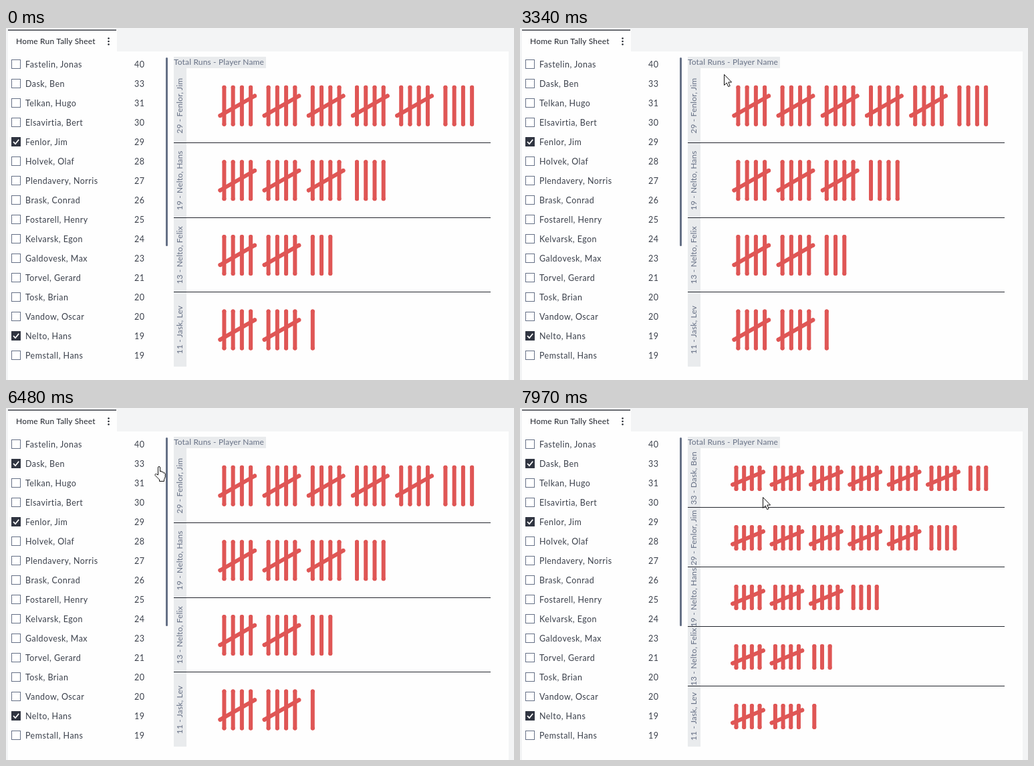
An HTML page for the animation above (8 s loop, 760 by 526 pixels).

```html
<!DOCTYPE html>
<html lang="en">
<head>
<meta charset="utf-8">
<title>Home Run Tally Sheet</title>
<style>
  html, body { margin: 0; width: 100%; height: 100%; overflow: hidden; background: #f3f4f5; }
  svg { display: block; }
  text { font-family: Lato, "Open Sans", sans-serif; font-size: 12.5px; letter-spacing: .45px; fill: #3b404b; }
  .title { font-size: 12px; letter-spacing: .2px; fill: #20242c; }
  .label { font-size: 12px; letter-spacing: .15px; fill: #667085; }
  .tally { stroke: #df5655; stroke-width: 6; stroke-linecap: round; }
</style>
</head>
<body>
<svg id="stage" width="760" height="526" xmlns="http://www.w3.org/2000/svg"></svg>
<script>
const LOOP = 8000, CHECK = 6240, SWAP = 6540, FADE = 560;
const TOP = 60.4;

const players = [
  ["Fastelin, Jonas", 40], ["Dask, Ben", 33], ["Telkan, Hugo", 31], ["Elsavirtia, Bert", 30],
  ["Fenlor, Jim", 29], ["Holvek, Olaf", 28], ["Plendavery, Norris", 27], ["Brask, Conrad", 26],
  ["Fostarell, Henry", 25], ["Kelvarsk, Egon", 24], ["Galdovesk, Max", 23], ["Torvel, Gerard", 21],
  ["Tosk, Brian", 20], ["Vandow, Oscar", 20], ["Nelto, Hans", 19], ["Pemstall, Hans", 19]
];
const before = [players[4], players[14], ["Nelto, Felix", 13], ["Jask, Lev", 11]];
const after = [players[1], ...before];

// Row height, first bar, bar spacing, half heights of bar and slash.
const wide = { row: 111.6, x: 326.4, step: 13.24, bar: 27.5, slash: 14.7 };
const tight = { row: 89, x: 323.5, step: 11.68, bar: 16, slash: 9.5 };

const rect = (x, y, w, h, fill, more = "") =>
  `<rect x="${x}" y="${y}" width="${w}" height="${h}" fill="${fill}" ${more}/>`;
const text = (x, y, s, cls = "", more = "") => `<text x="${x}" y="${y}" class="${cls}" ${more}>${s}</text>`;
const line = (x1, y1, x2, y2) => `<path d="M${x1} ${y1}L${x2} ${y2}"/>`;
// End dots are separate, so they show while the marks are translucent.
const stroke = (...p) => line(...p) + line(p[0], p[1], p[0], p[1]) + line(p[2], p[3], p[2], p[3]);
const middle = (i, look) => TOP + look.row * (i + .5);

// Every fifth run is a slash across the four bars before it.
function tally(runs, cy, { x, step, bar, slash }) {
  let out = "";
  for (let k = 0; k < runs; k++) {
    const bx = x + step * k;
    out += k % 5 < 4
      ? stroke(bx, cy - bar, bx, cy + bar)
      : stroke(bx - 4.45 * step, cy + slash, bx - .55 * step, cy - slash);
  }
  return out;
}

const tallies = (rows, look) => rows.map(([, runs], i) => tally(runs, middle(i, look), look));

const grid = (rows, look) => rows.map(([name, runs], i) =>
  (i ? rect(251, Math.round(TOP + look.row * i - 1), 474, 1, "#23262e") : "") +
  text(0, 0, `${runs} - ${name}`, "label",
    `text-anchor="middle" transform="translate(263.5 ${middle(i, look)}) rotate(-90)"`)
).join("");

// Leaving marks stay put but are cut off by the new row one place further down.
const leaving = () => before.slice(1).map(([, runs], i) => {
  const top = TOP + tight.row * (i + 2);
  return `<svg y="${top}" width="760" height="${tight.row}">${tally(runs, middle(i + 1, wide) - top, wide)}</svg>`;
}).join("");

const tick = (y, id) => `<g id="${id}">${rect(8, y - 7, 14, 14, "#303541", 'rx="1"')}
  <path d="M11 ${y}l3 3.2 5.2-6.4" fill="none" stroke="#fff" stroke-width="1.8"/></g>`;

const list = players.map((player, i) => {
  const y = 54 + 29 * i, [name, runs] = player;
  return rect(8.5, y - 6.5, 13, 13, "#fff", 'stroke="#657086"') +
    (after.includes(player) ? tick(y, "tick" + i) : "") +
    text(29, y + 5, name) + text(192, y + 5, runs);
}).join("");

const [firstRow, ...otherRows] = tallies(after, tight);

document.getElementById("stage").innerHTML =
  rect(3, 35, 749, 491, "#fefefe") + rect(3, 3, 163, 33, "#fefefe") + rect(3, 2.5, 162, 1.3, "#20242c") +
  text(15, 24, "Home Run Tally Sheet", "title") +
  [15.5, 20, 24.5].map(y => `<circle cx="153.5" cy="${y}" r="1.25" fill="#20242c"/>`).join("") +
  list + rect(239, 44, 3, 282, "#657086", 'rx="1.5"') +
  rect(251, 43, 138, 17, "#e9ebed") + rect(251, 60, 19, 446, "#e9ebed") +
  text(251, 55, "Total Runs - Player Name", "label") +
  `<g id="old">${grid(before, wide)}<g class="tally">${tallies(before, wide).join("")}</g></g>
  <g id="new">${grid(after, tight)}
    <g id="in" class="tally">${otherRows.join("")}</g>
    <g id="out" class="tally">${leaving()}</g>
    <g class="tally">${firstRow}</g>
  </g>
  <g id="cursor" fill="#fff" stroke="#111" stroke-linejoin="round">
    <path id="arrow" d="M.5.5V16.5L4.2 13 6.7 18.6 9.2 17.5 6.8 12H11.6Z"/>
    <path id="hand" transform="translate(-7 0)" d="M5.5 13V2a1.5 1.5 0 0 1 3 0V8q1.5-1.500 2.800 0v1q1.500-1.200 2.600.300v1q1.500-1 2.300.500V16l-1.700 4v2.500H7.500V20L1 13.500q0-3 2.500-1.500Z"/>
  </g>`;

// Pointer stops: time, x, y. From y = 526 on it is below the stage.
const route = [
  [0, 10, 526], [500, 10, 526], [575, 50, 497], [650, 112, 526],
  [870, 265, 526], [940, 265, 501], [1020, 265, 526], [1160, 248, 526],
  [1940, 590, 482], [2390, 742, 205], [2760, 696, 42], [3340, 305, 69], [3570, 221, 157],
  [4280, 242, 305], [4640, 242, 305], [4670, 242, 296], [5450, 86, 72], [5870, 14, 81],
  [6230, 14, 81], [6480, 229, 87], [6760, 240, 95], [7900, 269, 128], [7970, 363, 133], [LOOP, 363, 133]
];

function pointer(t) {
  const i = route.findIndex(stop => stop[0] > t);
  const [t0, x0, y0] = route[i - 1], [t1, x1, y1] = route[i];
  const k = (t - t0) / (t1 - t0);
  return [Math.round(x0 + (x1 - x0) * k), Math.round(y0 + (y1 - y0) * k)];
}

const $ = id => document.getElementById(id);
const show = (id, on) => $(id).setAttribute("display", on ? "inline" : "none");

function draw(now) {
  const t = now % LOOP;
  const p = Math.min(1, Math.max(0, (t - SWAP) / FADE));
  show("tick1", t >= CHECK);
  show("old", t < SWAP);
  show("new", t >= SWAP);
  show("out", p < 1);
  $("in").setAttribute("stroke-opacity", p);
  $("out").setAttribute("stroke-opacity", 1 - p);

  const [x, y] = pointer(t);
  const hand = x < 239 && y < 495;
  $("cursor").setAttribute("transform", `translate(${x} ${y})`);
  show("hand", hand);
  show("arrow", !hand);
  requestAnimationFrame(draw);
}
draw(performance.now());
</script>
</body>
</html>
```
